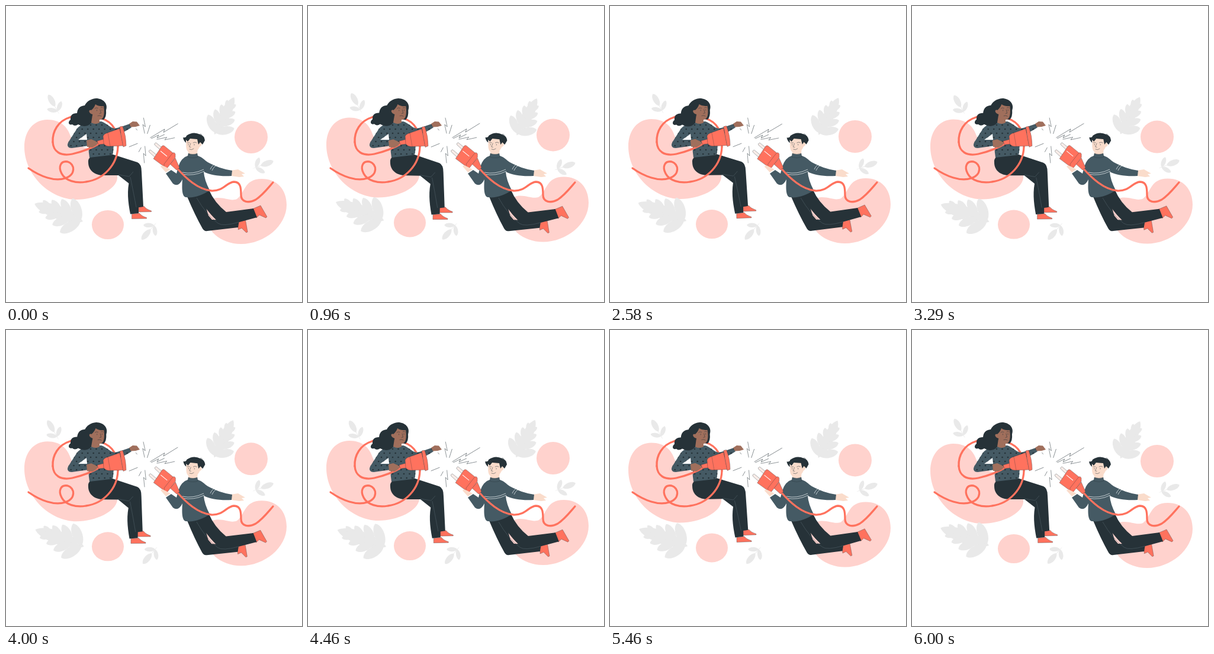
Animation of 500 by 500 pixels, one loop 6.04 s. Source, as an HTML page:

```html
<!DOCTYPE html>
<html lang="en">
<head>
<meta charset="utf-8">
<title>Plugs</title>
<style>
  html, body { margin: 0; height: 100%; overflow: hidden; background: #fff; }
  svg { display: block; width: 100vw; height: 100vh; }
  .pink { fill: #ffd2cd; }
  .coral { fill: #ff725e; }
  .dark { fill: #263238; }
  .knit { fill: #455a64; }
  .brown { fill: #a06f5c; }
  .skin { fill: #fadccb; }
  .cable { fill: none; stroke: #ff725e; stroke-width: 3.3; stroke-linecap: round; }
  .thin { fill: none; stroke: #263238; stroke-width: .5; stroke-linecap: round; stroke-linejoin: round; }
  .edge { stroke: #263238; stroke-width: .35; stroke-linejoin: round; }
  .seam { fill: none; stroke: #56666e; stroke-width: .5; }
  .stripe { fill: none; stroke: #dfe5e8; stroke-width: .8; }
</style>
</head>
<body>
<svg viewBox="0 0 500 500">
  <defs>
    <path id="sweater" fill-rule="evenodd" clip-rule="evenodd" d="M161 195C170 198 176 206 184 207Q196 204 209 199L212 205C202 212 192 216 183 219L181 247Q181 252 176 252L141 256Q139 246 140 236L111 240C104 240 102 235 106 229L120 207C126 200 136 197 146 196ZM136 216L122 226L137 226Z"/>
    <clipPath id="knitClip"><use href="#sweater"/></clipPath>
    <path id="flat" class="coral edge" d="M0 0L13 -1.500Q16 3 25 6V7.500L0 8Z"/>
    <path id="boot" class="coral edge" d="M0 0L14 -6L25 13L23 15L12 10L7 15Z"/>
  </defs>

  <g id="blobs" class="pink">
    <path d="M70 192C92 192 104 204 109 220C116 236 128 238 145 242C170 248 190 268 188 291C186 310 152 327 119 327C74 327 31 285 31 238C31 212 46 192 70 192Z"/>
    <path d="M432 292C458 292 474 310 474 336C474 371 437 402 397 402C362 402 336 378 336 350C336 332 346 324 358 324C372 324 380 330 390 326C404 316 402 292 432 292Z"/>
    <ellipse cx="414" cy="221.500" rx="28" ry="27.500"/>
    <ellipse cx="172" cy="369.500" rx="27" ry="24.500"/>
  </g>
  <g id="leaves" fill="#e9e9e9"></g>
  <g id="sparks" class="thin"></g>

  <path class="cable" d="M189 238C190 212 180 196 162 190C140 181 118 183 108 188C88 194 78 212 79 230"/>

  <!-- woman -->
  <g id="womanLegs">
    <use href="#flat" x="212.500" y="351.500"/>
    <use href="#flat" x="220.500" y="340"/>
    <path class="dark" d="M206 284H224V350L210 351.500C206 330 204 312 209 292Z"/>
    <path class="dark" d="M139 264C138 256 145 252 155 252L178 250L222 264Q229 267 229 280L232 339L219 341L208 300L190 286H165C150 286 139 278 139 264Z"/>
    <path class="seam" d="M190 285L208 288L215 280M210 289Q216 318 220 340"/>
  </g>
  <use href="#sweater" class="knit"/>
  <g id="dots" class="dark" clip-path="url(#knitClip)"></g>
  <path class="brown" d="M208 199L214 195L221 195.500L226 202L219 204L211 204.500Z"/>
  <g id="womanHead">
    <path class="dark" d="M169 176C173 165 164 156 152 156C142 157 136 162 133 168Q121 169 120 181Q108 181 109 192C103 197 107 202 112 200Q116 204 122 200Q130 205 138 202Q146 198 147 190L165 192Q170 187 169 176Z"/>
    <path class="brown" d="M146 184L144 197Q151 201 158 197V190Z"/>
    <path class="brown" d="M144 176C139 174 139 181 146 183C148 190 153 193 159 192C165 191 167 183 165 169Q157 170 151 166Q149 172 144 176Z"/>
    <path class="thin" d="M150 173Q152 171 155 172.500M160 172Q162 170.500 164 172M153.500 175.500V177M162 175V176.500M159 175L160.500 181L158 181.500M155 185.500Q158 184 161 186"/>
  </g>
  <path class="cable" d="M38 274C58 288 82 297 100 291C118 285 117 267 104 263C92 261 88 272 94 283C100 295 118 300 135 297C165 293 188 268 189 238M79 230C80 246 92 254 112 250C130 246 145 240 160 231"/>
  <g id="socket">
    <g class="coral edge">
      <path d="M154 228L165 225L167 233L156 234Z"/>
      <path d="M164 220Q165 216 172 214L192 207L198 236L175 237Q167 237 165 232Z"/>
      <path d="M192 204L197 203Q203 220 203 236L198 238Z"/>
    </g>
    <path class="thin" d="M172 214L176 237" opacity=".6"/>
    <path class="brown" d="M136 227L144 225L155 230L153 235L146 239L137 238Z"/>
  </g>

  <!-- man -->
  <g id="manLegs">
    <use href="#boot" transform="translate(391 363) rotate(20) scale(.9)"/>
    <use href="#boot" transform="translate(416 343)"/>
    <path class="dark" d="M306 322L330 314L342 354L348 361L394 362L392 374L340 380Q335 381 332 376Q319 353 306 322Z"/>
    <path class="dark" d="M318 318L343 311Q352 332 372 348L418 342L424 357L372 371Q364 372 346 352Z"/>
    <path class="seam" d="M322 324Q338 352 358 367Q366 373 394 365"/>
  </g>
  <path class="skin" d="M379 278L392 276L404 283L398 284L402 288L394 289L380 287Z"/>
  <path class="knit" d="M300 257C305 252 315 251 324 253C331 255 335 260 341 264C354 271 368 276 382 278L381 287C362 288 346 286 334 280Q335 294 344 311C332 320 316 325 304 323C297 322 297 308 298 293Q291 307 282 300L270 283L279 277L288 283C291 272 293 262 300 257Z"/>
  <path class="stripe" d="M298 281Q316 285 334 276M298 284Q317 288 335 279M345 276Q347 271 351 268M348 278Q350 273 354 270"/>
  <g id="manHead">
    <path class="skin" d="M308 240L324 238L323 251Q315 254 308 251Z"/>
    <path class="knit edge" d="M308 249Q316 252 323 249L324 255Q316 258 307 255Z"/>
    <path class="skin" d="M305 224C303 238 304 247 312 248C320 249 325 243 327 238Q333 235 329 229L326 222Z"/>
    <path class="dark" d="M299 222Q304 223 305 219Q316 211 328 217Q335 219 336 227L332 234L328 230L325 234L323 225L311 224L307 229L304 226V231Q300 228 299 222Z"/>
    <path class="thin" d="M326 218Q329 214 331 218M306 231H310M316 231Q319 229 322 231M308 233.500V235M318 233.500V235M312 232L309.500 238L312 238.500M310 242Q314 244 317 241"/>
  </g>
  <path class="cable" d="M288 273C304 291 324 310 347 312C368 313 372 298 385 297C397 297 397 309 397 319C397 331 409 334 422 327C434 319 443 307 451 298"/>
  <g id="plug">
    <g fill="#f8ece8" class="edge">
      <path id="prong" d="M242 247Q240 244 244 243L255 252L252 256Z"/>
      <use href="#prong" x="9.500" y="-12"/>
    </g>
    <g class="coral edge">
      <path d="M277 267L286 257L293 273L288 277Z"/>
      <path d="M249 258L263 237Q265 235 267 236L283 249L268 272Z"/>
      <path d="M281 249Q284 246 286 250V256L273 273Q270 275 267 272V267Z"/>
    </g>
    <path d="M261 245L272 254" stroke="#fff"/>
    <path class="skin" d="M261 271Q264 268 268 271L278 276L270 281Z"/>
  </g>
</svg>
<script>
const PERIOD = 3020;
const $ = id => document.getElementById(id);
const rad = deg => deg * Math.PI / 180;

function add(parent, name, attrs) {
  const el = document.createElementNS("http://www.w3.org/2000/svg", name);
  for (const key in attrs) el.setAttribute(key, attrs[key]);
  $(parent).append(el);
}

function leaf(x, y, angle, len, width) {
  const a = len * .2, b = len * .85;
  add("leaves", "path", {
    d: `M0 0C${a} ${-width} ${b} ${-width} ${len} 0C${b} ${width} ${a} ${width} 0 0Z`,
    transform: `translate(${x} ${y}) rotate(${angle})`
  });
}

// Visits a point at the given distance along a stem.
const along = (x, y, angle, dist) => [x + dist * Math.cos(rad(angle)), y + dist * Math.sin(rad(angle))];

function sprig(x, y, angle) {
  leaf(x, y, angle, 18, .6);
  leaf(...along(x, y, angle, 15), angle, 23, 6.5);
  for (const side of [-1, 1]) leaf(...along(x, y, angle, 6), angle + side * 50, 18, 5);
}

function frond(x, y, angle, len) {
  leaf(x, y, angle, len, len * .17);
  for (let i = 0; i < 4; i++)
    for (const side of [-1, 1])
      leaf(...along(x, y, angle, len * (.05 + i * .2)), angle + side * (50 - i * 7), len * (.46 - i * .07), len * (.13 - i * .02));
}

sprig(90, 183, -119);
sprig(416, 275, -20);
sprig(254, 366, 131);
frond(352, 217, -62, 71);
frond(130, 364, 200, 87);

// Rays around the gap between the plugs; long ones zigzag.
function ray(angle, from, to) {
  const bend = to - from > 18 ? 2 : 0, mid = (from + to) / 2;
  add("sparks", "path", {
    d: `M${from} 0L${mid + bend} ${-bend}L${mid - bend} ${bend}L${to} 0`,
    transform: `translate(235 227) rotate(${angle})`
  });
}
[[-94, 12, 38], [-72, 12, 27], [-27, 10, 62], [-17, 11, 34], [-5, 20, 50],
 [92, 10, 38], [119, 14, 22], [158, 14, 29], [-128, 22, 25]].forEach(r => ray(...r));

for (let row = 0; row < 8; row++)
  for (let col = 0; col < 12; col++)
    add("dots", "circle", { cx: 105 + col * 9.5 + row % 2 * 4.7, cy: 201 + row * 7, r: 1.3 });

const turn = (id, angle, x, y) => $(id).setAttribute("transform", `rotate(${angle} ${x} ${y})`);

function draw(now) {
  const phase = 2 * Math.PI * now / PERIOD;
  const sway = Math.sin(phase);
  $("blobs").setAttribute("transform", `translate(0 ${-2.5 * (1 - Math.cos(phase))})`);
  turn("leaves", Math.sin(phase / 2), 250, 250);
  turn("womanLegs", sway, 150, 260);
  turn("womanHead", sway, 152, 196);
  turn("socket", sway * .4, 110, 236);
  turn("manLegs", sway * .7, 322, 315);
  turn("manHead", sway, 315, 252);
  turn("plug", sway * .4, 285, 300);
  turn("sparks", sway * -.6, 234, 226);
  requestAnimationFrame(draw);
}
requestAnimationFrame(draw);
</script>
</body>
</html>
```
